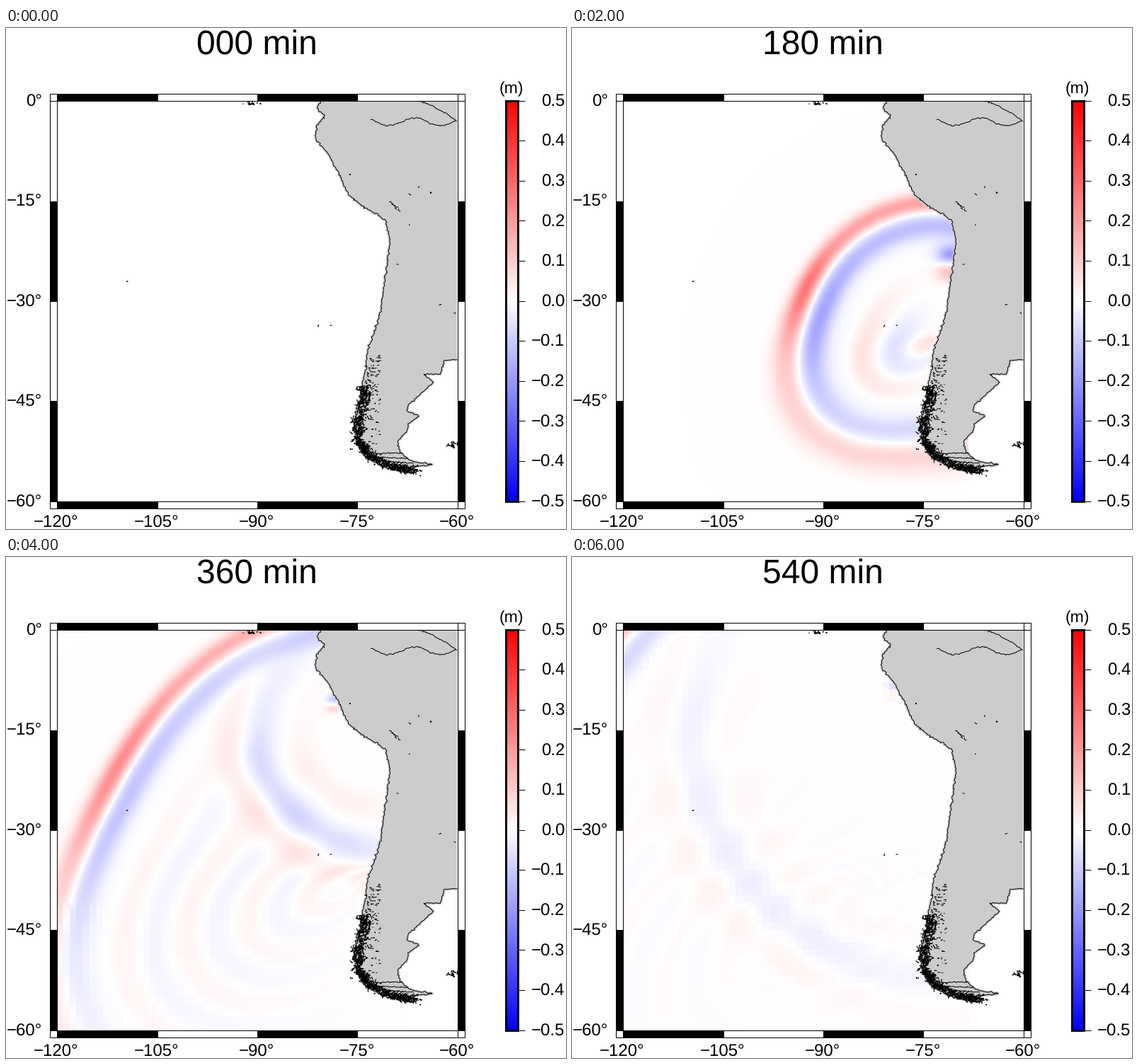
Animation, 791 px wide and 708 px high, one loop 6330 ms. Source, as a matplotlib script:

```python
import numpy as np
import matplotlib.pyplot as plt
from matplotlib.animation import FuncAnimation
from matplotlib.collections import LineCollection
from matplotlib.patches import Rectangle

W, H, DPI = 791, 708, 64
PT = 72 / DPI
LEFT, TOP, SIDE = 71, 102, 566
RIGHT, BOTTOM = LEFT + SIDE, TOP + SIDE
STEPS, LOOP, TICK = 19, 6330, 30
rng = np.random.default_rng(4)

plt.rcParams.update({"font.family": "Liberation Sans", "text.hinting": "none"})
fig = plt.figure(figsize=(W / DPI, H / DPI), dpi=DPI, facecolor="white")
ax = fig.add_axes([0, 0, 1, 1])
ax.axis("off")

# key points of the two coasts, north to south and back north
WEST = [(445, 102), (440, 113), (450, 125), (439, 138), (437, 157), (453, 174),
        (470, 206), (484, 236), (500, 249), (536, 271), (542, 300), (538, 335),
        (529, 400), (521, 430), (511, 455), (508, 485), (502, 510), (499, 535),
        (492, 560), (495, 588), (508, 606), (535, 620), (574, 629)]
EAST = [(574, 629), (560, 622), (602, 617), (572, 612), (557, 600), (553, 584),
        (566, 570), (568, 560), (584, 548), (566, 541), (568, 533), (588, 515),
        (604, 501), (590, 489), (614, 489), (619, 470), (637, 468)]


# ---------- wave field ----------
def bump(distance, width):
    return np.exp(-.5 * (distance / width) ** 2)


def polar(x, y, cx, cy):
    """Distance and angle in degrees, 0 to the west and 90 to the north."""
    return np.hypot(x - cx, y - cy), np.degrees(np.arctan2(cy - y, cx - x))


def behind_front(x, y, t):
    """Signed distance to the leading crest, and the angle from the source."""
    r, theta = polar(x, y, 520, 440)
    south = np.sin(np.radians(np.clip(-theta, 0, 90)))
    start = 14 + 6 * np.cos(np.radians(theta)) - 35 * south ** 2 * min(1, t / 120)
    speed = 1 + .34 * bump(theta + 32, 24) * t / 360
    return r - start - speed * t, theta


def main_wave(x, y, t):
    s, theta = behind_front(x, y, t)
    age = max(0, t - 120)
    north = 1 / (1 + np.exp(-(theta + 5) / 10))
    fade = north + (1 - north) * np.exp(-age / 180)
    crest = (.13 + .06 * north + .11 * bump(theta - 20, 12)) * np.exp(-age / 1200)
    trough = (.14 + .08 * bump(theta - 3, 22)) * np.exp(-age / 500)
    h = fade * crest * bump(s, 20 - 10 * north)
    h -= fade * trough * bump(s + 34, 18 - 5 * north)
    train = .08 * np.exp(-age / 170) / (1 + np.exp((s + 85) / 7))
    return h + train * bump(theta + 8, 38) * np.cos(2 * np.pi * (s + 200) / 94)


def reflection(x, y, t):
    r, theta = polar(x, y, 545, 275)
    s = r - 1.05 * (t - 180) + 50 * np.sin(np.radians(np.clip(-theta, 0, 90)))
    amp = .14 * np.clip((t - 180) / 60, 0, 1) * np.exp(-(t - 240) / 200)
    width = 13 + max(0, t - 240) / 40
    shape = .6 * bump(s - 42, width) - bump(s, width) + .35 * bump(s + 60, width)
    return amp * bump(theta + 30, 45) * shape


def edge_wave(x, y, t):
    """A short wave trapped at the coast, running north and slowing down."""
    age = max(0, t - 120)
    cy = 180 + 265 * np.exp(-age / 95)
    cx = np.interp(cy, *np.array(WEST)[:, ::-1].T) - 4
    size = 5 + 11 * bump(t - 240, 50)
    near = bump(x - cx, 1.4 * size)
    amp = .25 * np.exp(-age / 300)
    return amp * near * (.7 * bump(y - cy - 2.2 * size, size) - bump(y - cy, size))


def height(x, y, t):
    h = main_wave(x, y, t) + reflection(x, y, t) + edge_wave(x, y, t)
    return np.where(x > 560, 0, h)


def wave_colors(value):
    v = np.clip(value / .5, -1, 1)
    return np.stack([1 + np.minimum(v, 0), 1 - abs(v), 1 - np.maximum(v, 0)], -1)


def wave_image(t):
    y, x = np.mgrid[TOP:BOTTOM, LEFT:RIGHT] + .5
    if t == 0:
        return np.ones(x.shape + (3,))
    # calm water is stored on a coarse one-degree grid
    if t >= 240:
        cell = SIDE / 60
        coarse = y > 537 - .8 * max(0, t - 300)
        if t >= 420:
            coarse |= behind_front(x, y, t)[0] < -55
        x = np.where(coarse, LEFT + ((x - LEFT) // cell + .5) * cell, x)
        y = np.where(coarse, TOP + ((y - TOP) // cell + .5) * cell, y)
    return wave_colors(height(x, y, t))


# ---------- map ----------
def along(points, fractions):
    points = np.array(points, float)
    length = np.r_[0, np.cumsum(np.hypot(*np.diff(points, axis=0).T))]
    u = fractions * length[-1]
    return np.c_[np.interp(u, length, points[:, 0]), np.interp(u, length, points[:, 1])]


def rough(points, jitter=.7):
    length = np.hypot(*np.diff(np.array(points), axis=0).T).sum()
    line = along(points, np.linspace(0, 1, int(length / 2) + 2))
    line[1:-1] += rng.normal(0, jitter, line[1:-1].shape)
    return line


def scribbles(centers, reach, count=4):
    walks = np.cumsum(rng.normal(0, reach, (len(centers), count, 2)), axis=1)
    walks -= walks.mean(axis=1, keepdims=True)
    return list(np.asarray(centers, float)[:, None] + walks)


def scatter(center, spread, count):
    return rng.normal(center, spread, (count, 2))


def add_lines(lines, color="black", width=1.0, z=4):
    ax.add_collection(LineCollection(lines, colors=color, linewidths=width * PT, zorder=z))


def rivers():
    x = np.arange(515, 638, 3)
    yield np.c_[x, 132.5 + 5.5 * np.sin(2 * np.pi * (x - 523) / 72)]
    x = np.linspace(579, 637, 25)
    yield np.c_[x, 103 + 29 * ((x - 579) / 58) ** 1.5]
    for k in range(3):
        yield [(505 + 5 * k, 601 + 5 * k), (560 + 8 * k, 601 + 7 * k)]


def draw_map():
    west, east = rough(WEST), rough(EAST, .5)
    land = np.vstack([west, east, [(RIGHT, TOP)]])
    add_lines([west, east], "#cfcfcf", 4, 2)
    ax.fill(*land.T, color="#cccccc", lw=0, zorder=3)
    add_lines([west, east] + [rough(river, .5) for river in rivers()])

    channels = WEST[-7:]
    fjords = along(channels, rng.random(560)) + rng.normal((5, -2), (4.2, 2.6), (560, 2))
    add_lines(scribbles(fjords, 1.8), width=1.1)
    lakes = np.c_[rng.uniform(513, 529, 60), rng.uniform(462, 592, 60)]
    add_lines(scribbles(lakes, (2, .9), 3))
    add_lines(scribbles(scatter((512, 500), (4, 11), 30), 1.3, 3))

    galapagos, falklands = scatter((347, 107), (5, 2), 18), scatter((631, 589), (3, 2), 18)
    add_lines(scribbles(galapagos, .9) + scribbles(falklands, 1.4))
    andes = along([(543, 246), (555, 257)], np.linspace(0, 1, 5))
    add_lines(scribbles(andes, 1.8))
    specks = [(171, 358), (441, 421), (459, 420), (486, 207), (570, 235), (583, 225),
              (600, 233), (570, 278), (553, 334), (613, 391), (634, 403), (449, 127)]
    add_lines(scribbles(specks, .9))


# ---------- frame, labels, scale ----------
def box(x0, y0, x1, y1, face, line=1.0):
    ax.add_patch(Rectangle((x0 + .5, y0 + .5), x1 - x0, y1 - y0, fc=face, ec="black",
                           lw=line * PT, joinstyle="miter", zorder=6))


def label(x, y, text, size=24, ha="center"):
    return ax.text(x, y, text.replace("-", "\u2212"), size=size * PT, ha=ha,
                   va="baseline", zorder=8)


def picture(rgb, x0, x1, z):
    return ax.imshow(rgb, extent=(x0, x1, BOTTOM, TOP), aspect="auto",
                     interpolation="nearest", zorder=z)


def draw_frame():
    border, quarter = 10, SIDE / 4
    for x in (LEFT - border, RIGHT):
        for y in (TOP - border, BOTTOM):
            box(x, y, x + border, y + border, "white")
    for i in range(4):
        a, b = round(i * quarter), round((i + 1) * quarter)
        for y in (TOP - border, BOTTOM):
            box(LEFT + a, y, LEFT + b, y + border, "white" if i % 2 else "black")
        for x in (LEFT - border, RIGHT):
            box(x, TOP + a, x + border, TOP + b, "black" if i % 2 else "white")
    for i in range(5):
        label(LEFT + i * quarter, 706, f"{15 * i - 120}°")
        label(51, TOP + i * quarter + 8.5, f"{-15 * i}°", ha="right")


def draw_scale():
    picture(wave_colors(np.linspace(.5, -.5, SIDE))[:, None], 705, 723, 5)
    box(705, TOP, 722, BOTTOM, "none", 3)
    label(713.5, 92, "(m)", 23)
    for i in range(11):
        y = TOP + i * SIDE / 10
        add_lines([[(723, y + .5), (733, y + .5)]], z=7)
        label(789.5, y + 8.5, f"{(5 - i) / 10:.1f}", ha="right")


waves = [wave_image(30 * k) for k in range(STEPS)]
sea = picture(waves[0], LEFT, RIGHT, 1)
draw_map()
draw_frame()
draw_scale()
title = label(354, 38, "000 min", 48)
ax.set(xlim=(0, W), ylim=(H, 0))


def update(i):
    step = (i * TICK + TICK - 1) * STEPS // LOOP
    sea.set_data(waves[step])
    title.set_text(f"{30 * step:03d} min")
    return sea, title


anim = FuncAnimation(fig, update, frames=LOOP // TICK, interval=TICK,
                     repeat=True, repeat_delay=0, blit=False)
plt.show()
```
